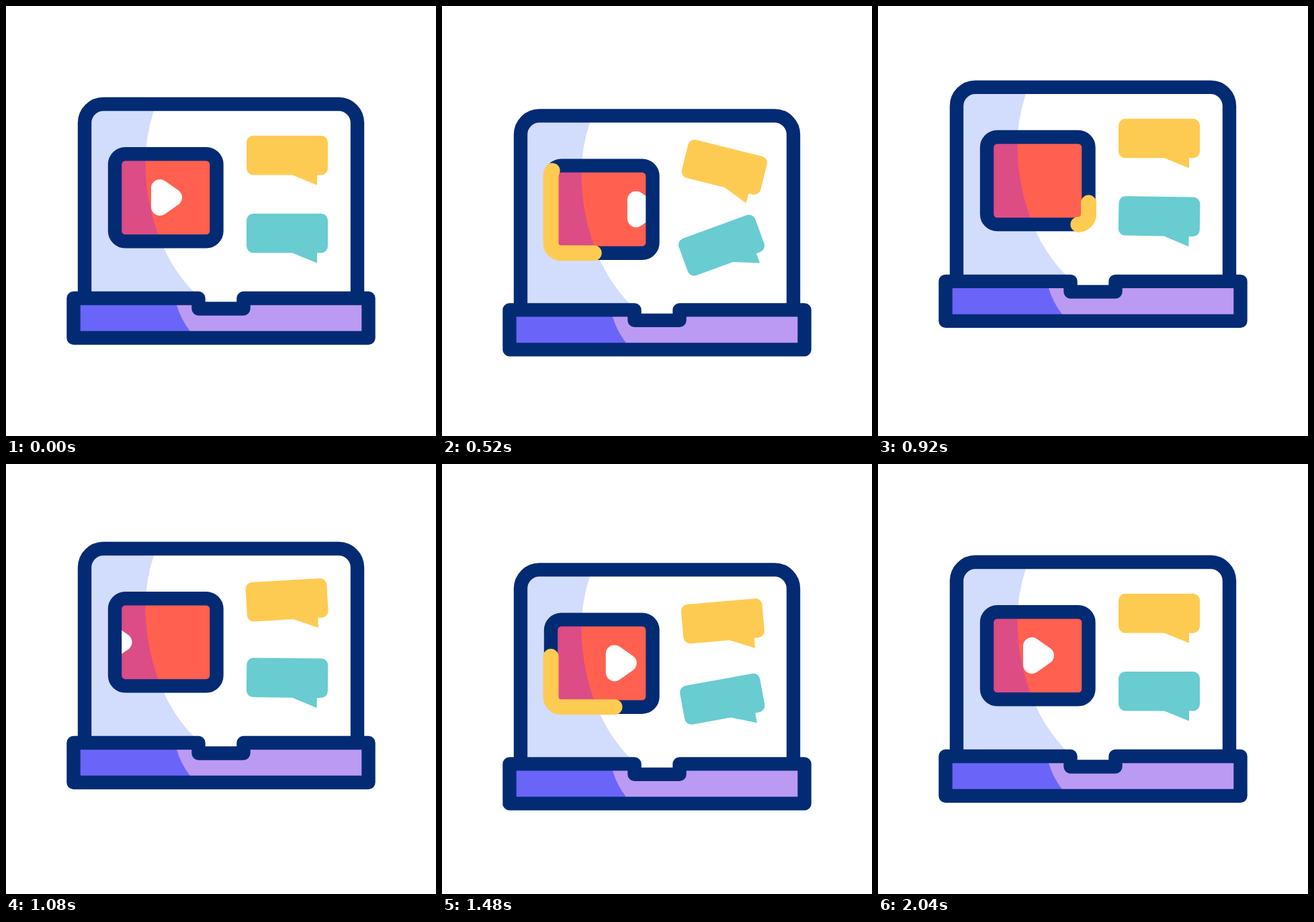
Animation, 640 px wide and 640 px high, one loop 2.24 s. Source, as an HTML page:

```html
<!DOCTYPE html>
<html lang="en">
<head>
<meta charset="utf-8">
<title>Video chat laptop</title>
<style>
  html, body { margin: 0; height: 100%; overflow: hidden; background: #fff; }
  svg { display: block; width: 100%; height: 100%; }
  .line { fill: none; stroke: #032b74; stroke-width: 20.4; stroke-linejoin: round; }
</style>
</head>
<body>
<svg viewBox="0 0 640 640">
  <defs>
    <path id="shade" d="M117 146H223L220 156Q207.5 194 207.5 232C207.5 305 233 380 281 427V432H117Z"/>
    <path id="bubble" d="M368 193H469a10 10 0 0 1 10 10V241.500a10 10 0 0 1 -10 10H463V266.500L426 251.500H368a10 10 0 0 1 -10 -10V203a10 10 0 0 1 10 -10Z"/>
    <path id="frame" d="M298 350.300H177.500a15.500 15.500 0 0 1 -15.500 -15.500V235.700a15.500 15.500 0 0 1 15.500 -15.500H298a15.500 15.500 0 0 1 15.500 15.500V334.800a15.500 15.500 0 0 1 -15.500 15.500Z"/>
    <clipPath id="screen"><path d="M117 435V174a28 28 0 0 1 28 -28H495a28 28 0 0 1 28 28V435Z"/></clipPath>
    <clipPath id="video"><use href="#frame"/></clipPath>
  </defs>
  <g id="laptop">
    <use href="#shade" fill="#d2dcfd" clip-path="url(#screen)"/>
    <path class="line" d="M117 435V174a28 28 0 0 1 28 -28H495a28 28 0 0 1 28 28V435"/>

    <path fill="#bb9af3" d="M100.500 435H286.500V450.500H353.500V435H539.500V494H100.500Z"/>
    <path fill="#6a65f8" d="M100.500 435H251L254 445Q260 466 274 484L280 494H100.500Z"/>
    <path class="line" d="M100.500 435H286.500V450.500H353.500V435H539.500V494H100.500Z"/>

    <g clip-path="url(#video)">
      <use href="#frame" fill="#ff6050"/>
      <use href="#shade" fill="#dc4c85"/>
      <path id="play" d="M229 271L249 285L229 299Z" fill="#fff" stroke="#fff" stroke-width="26" stroke-linejoin="round"/>
    </g>
    <use href="#frame" class="line"/>
    <path id="streak" fill="none" stroke="#fecb52" stroke-width="23" stroke-linecap="round"/>

    <use id="top" href="#bubble" fill="#fecb52"/>
    <g transform="translate(0 116)"><use id="bottom" href="#bubble" fill="#68ccd1"/></g>
  </g>
</svg>
<script>
const $ = id => document.getElementById(id);
const LOOP = 2240, STEP = 40;

// Keys are [time in ms, value]
const lift = [[33, 0], [448, 20], [945, -25.5], [1497, 11.5], [1910, 0]];
const slideOut = [[33, 0], [200, -24], [700, 95]];
const slideIn = [[950, -95], [1450, 28], [2033, 0]];
const topTilt = [[33, 0], [400, 16.2], [920, 0], [1330, -10], [1750, 7.3], [2033, 0]];
const bottomTilt = [[33, 0], [480, -20.5], [940, 1], [1240, 0], [1620, -15], [2033, 0]];

function ease(x) {
  x = Math.min(1, Math.max(0, x));
  return x * x * (3 - 2 * x);
}

function at(keys, t) {
  let value = keys[0][1];
  for (let i = 1; i < keys.length; i++) {
    const [t0, v0] = keys[i - 1], [t1, v1] = keys[i];
    value += (v1 - v0) * ease((t - t0) / (t1 - t0));
  }
  return value;
}

const streak = $("streak");
streak.setAttribute("d", $("frame").getAttribute("d"));
const length = streak.getTotalLength();

// The streak runs round the video frame twice, its tail following its head
function drawStreak(t) {
  const start = t < 1120 ? 200 : 1200;
  const head = length * ease((t - start) / 667);
  const tail = length * ease((t - start - 167) / 667);
  streak.setAttribute("visibility", head - tail > 0.1 ? "visible" : "hidden");
  streak.setAttribute("stroke-dasharray", `${head - tail} 999`);
  streak.setAttribute("stroke-dashoffset", -tail);
}

function draw(now) {
  const t = Math.floor(now % LOOP / STEP) * STEP;
  const move = (id, value) => $(id).setAttribute("transform", value);
  move("laptop", `translate(0 ${at(lift, t)})`);
  move("play", `translate(${at(t < 820 ? slideOut : slideIn, t)} 0)`);
  move("top", `rotate(${at(topTilt, t)} 418.5 229.5)`);
  move("bottom", `rotate(${at(bottomTilt, t)} 418.5 229.5)`);
  drawStreak(t);
}

const begin = performance.now();
function tick() {
  draw(performance.now() - begin);
  requestAnimationFrame(tick);
}
tick();
</script>
</body>
</html>
```
